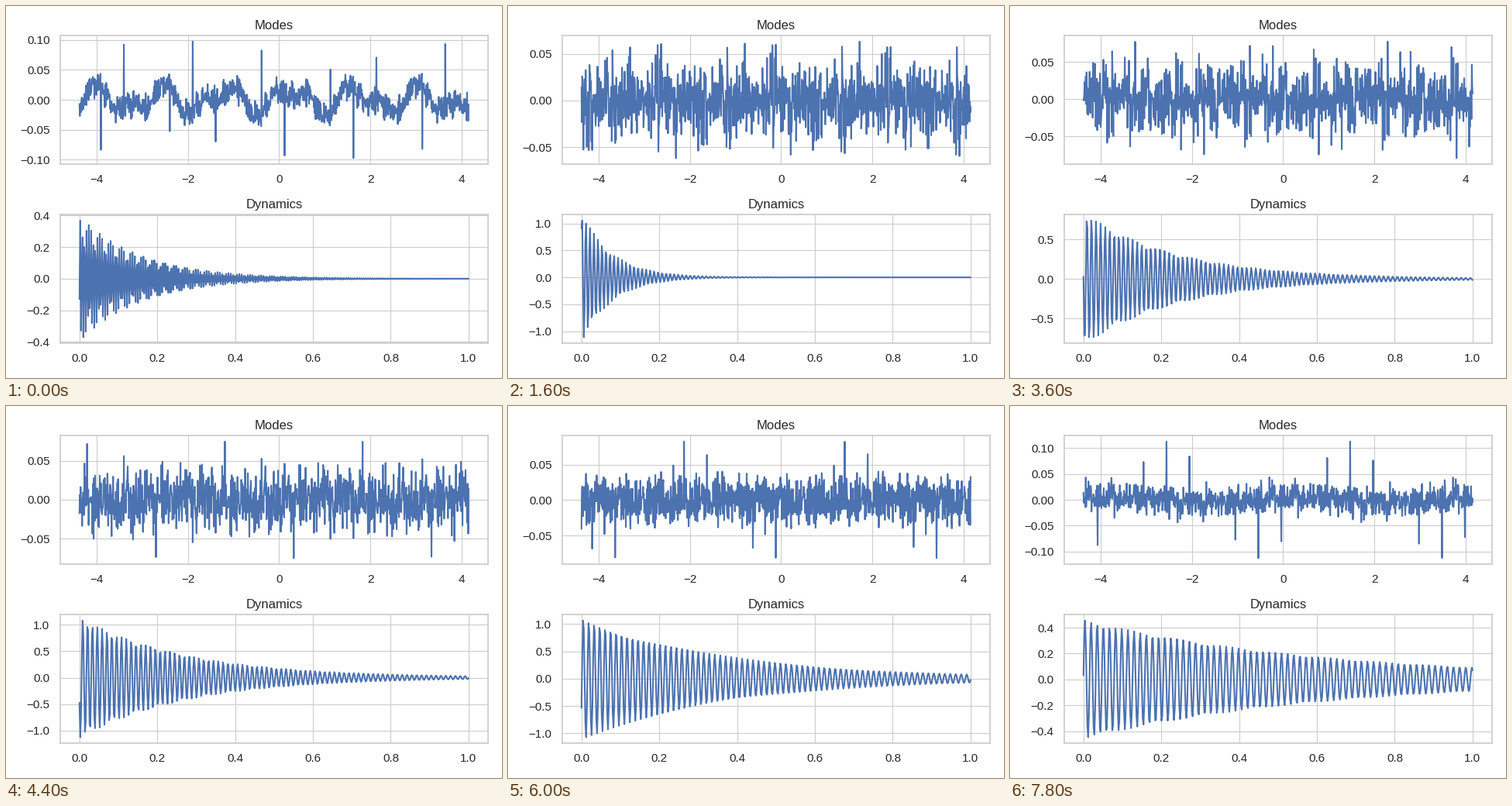
Write a matplotlib script that moves like this. It is 640 px wide and 480 px high and loops after 8 s.

```python
import numpy as np
import matplotlib.pyplot as plt
from matplotlib.animation import FuncAnimation

FRAMES, STEP_MS = 40, 200
BLUE = "#4C72B0"
PERIOD, CELL = 0.5025, 60          # length and samples of one spatial cell
X = np.arange(1018) * PERIOD / CELL - 4.37
T = np.linspace(0, 1, 500)

# A few key points; every frame takes its values by interpolation.
KEYS = [0, 8, 14, 18, 26, 34, 39]
TURN = [128.7, 70, 67, 61.5, 54.5, 48, 45.7]      # degrees per sample or cell
START = [-109, -42, 49, 88, 141, 342, 274]        # first angle of the dynamics
SHIFT = [83, 192, -18, -101, 135, 154, 219]       # angle of the first cell
SIZE = [.37, 1.11, .8, .738, 1.505, .635, .455]   # largest value of the dynamics
PEAK = [.0974, .0633, .1175, .0794, .0704, .0945, .113]  # and of the mode

plt.rcParams.update({
    "font.family": "Liberation Sans", "font.size": 12,
    "axes.titlesize": 12, "xtick.labelsize": 11, "ytick.labelsize": 11,
    "text.color": ".15", "xtick.color": ".15", "ytick.color": ".15",
    "axes.edgecolor": ".8", "axes.linewidth": 1.25, "axes.axisbelow": True,
    "axes.grid": True, "grid.color": ".8", "grid.linewidth": .8,
    "xtick.bottom": False, "ytick.left": False,
    "xtick.major.size": 6, "ytick.major.size": 6,
    "lines.linewidth": 1.5, "lines.solid_capstyle": "round",
})


def at(i, values):
    return np.interp(i, KEYS, values)


def scaled(y, top):
    return y * top / np.abs(y).max()


def dynamics(i):
    """Damped wave; the damping weakens with time, with one short burst."""
    decay = 6.3 - .12 * i + 7.5 * np.exp(-((i - 8) / 2) ** 2)
    angle = np.radians(at(i, START) + at(i, TURN) * np.arange(T.size))
    return scaled(np.exp(-decay * T) * np.cos(angle), at(i, SIZE))


def mode(i):
    """One noisy cell with a sharp pulse, turned by a fixed angle per cell."""
    rng = np.random.default_rng(100 + i)
    turn, peak = at(i, TURN), at(i, PEAK)
    swell = max(0, 1 - i / 4)
    noise = (.028 - .1 * peak) * (1 - .35 * swell)
    cell = noise * (rng.normal(size=CELL) + 1j * rng.normal(size=CELL))
    cell[0] = peak

    first = -4.40 + .0088 * i
    k = np.arange(X.size) - round((first - X[0]) * CELL / PERIOD)
    n = (k + CELL // 2) // CELL
    y = (cell[k % CELL] * np.exp(1j * np.radians(at(i, SHIFT) + turn * n))).real

    u = np.radians((X - 3.05) / PERIOD)
    waves = .018 * np.cos(turn * u) + .012 * np.cos((360 - turn) * u)
    y += swell * waves * (k % CELL != 0)
    return scaled(y, peak)


fig, axes = plt.subplots(2, 1, figsize=(6.4, 4.8), dpi=100)
lines = []
for ax, title in zip(axes, ("Modes", "Dynamics")):
    ax.set_title(title)
    lines += ax.plot([], [], color=BLUE)


def draw(i):
    lines[0].set_data(X, mode(i))
    lines[1].set_data(T, dynamics(i))
    for ax in axes:
        ax.relim()
        ax.autoscale_view()
    fig.tight_layout()
    return lines


anim = FuncAnimation(fig, draw, frames=FRAMES, interval=STEP_MS,
                     repeat=True, repeat_delay=0, blit=False)
plt.show()
```
